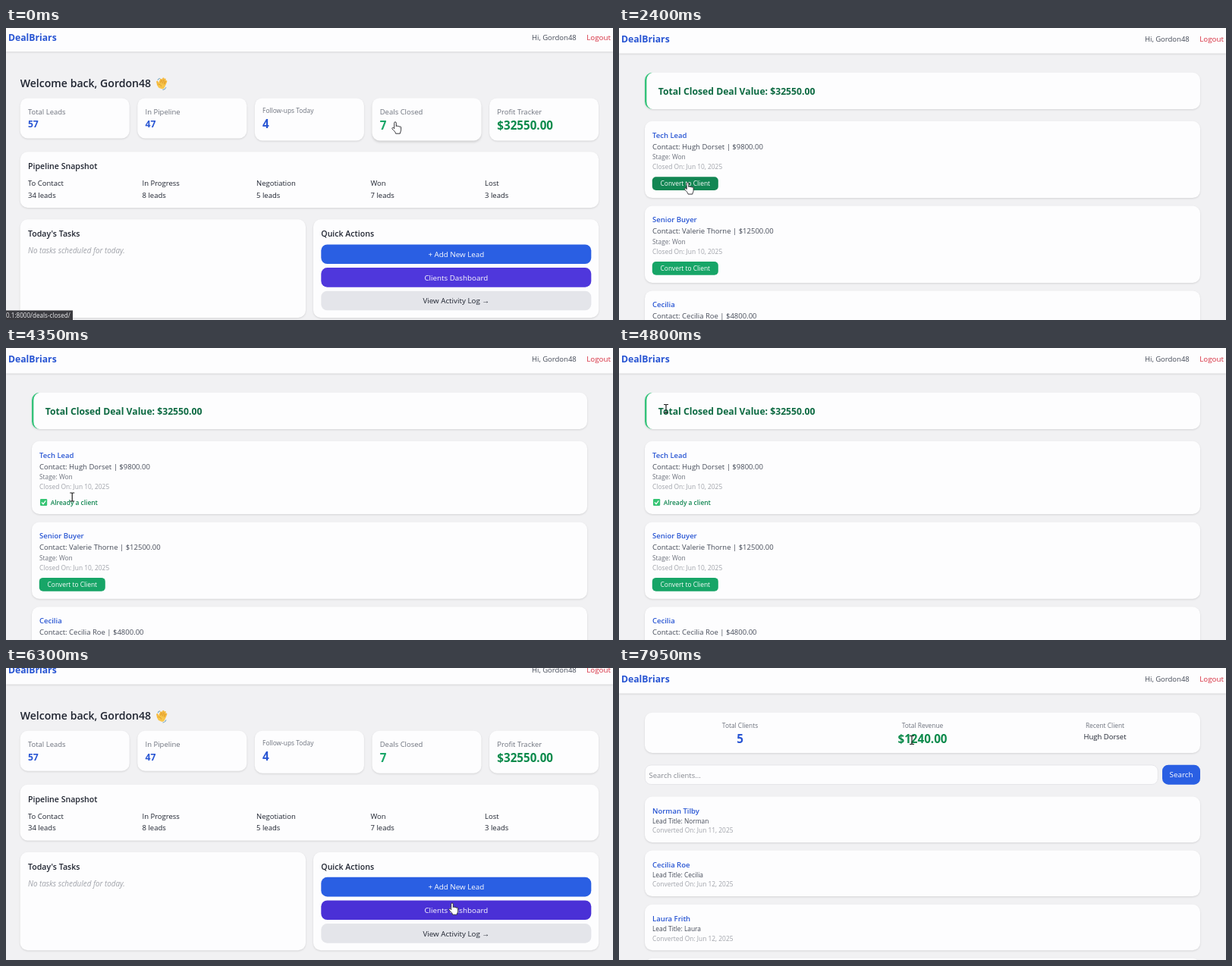
An HTML page for the animation above (8 s loop, 800x385 px).

```html
<!DOCTYPE html>
<html lang="en">
<head>
<meta charset="utf-8">
<title>Lead manager</title>
<style>
  html, body { margin: 0; width: 100%; height: 100%; overflow: hidden; background: #f1f1f3; }
  svg { display: block; width: 800px; height: 385px; }
  text { font-family: "Open Sans", "Noto Sans", sans-serif; white-space: pre; }
  .card { fill: #fdfdfe; filter: drop-shadow(0 1px 1px rgba(0, 0, 0, .12)); }
  .raised { filter: drop-shadow(0 2px 1.5px rgba(0, 0, 0, .14)); }
</style>
</head>
<body>
<svg id="stage" viewBox="0 0 800 385"></svg>
<script>
const LOOP = 8000;
const BASE = 9.5, SMALL = 8.4, MEDIUM = 9.8, LARGE = 10.6, XL = 12.2, XXL = 15.2;
const INK = '#1f2430', SLATE = '#454b58', GRAY = '#6d727d', PALE = '#a0a3aa';
const BLUE = '#2855d3', BUTTON_BLUE = '#2a5fe3', INDIGO = '#4f37dc';
const GREEN = '#17a567', DEEP_GREEN = '#0b8a4b', RED = '#d62f40', WHITE = '#fdfdfe';
const BRAND = 'DealBriars', USER = 'Gordon48';

// Text is placed by the vertical middle of its capitals.
const text = (x, middle, content, size = BASE, fill = INK, weight = 400, extra = '') =>
  `<text x="${x}" y="${middle + size * .357}" font-size="${size}" fill="${fill}" font-weight="${weight}" ${extra}>${content}</text>`;
const centered = (x, middle, content, size, fill, weight) =>
  text(x, middle, content, size, fill, weight, 'text-anchor="middle"');
const box = (x, y, w, h, r, attrs) =>
  `<rect x="${x}" y="${y}" width="${w}" height="${h}" rx="${r}" ${attrs}/>`;
const card = (x, y, w, h, id = '') => box(x, y, w, h, 10, `class="card" ${id && `id="${id}"`}`);
const button = (x, y, w, h, label, fill, { r = 8, size = MEDIUM, color = WHITE, id = '' } = {}) =>
  box(x, y, w, h, r, `fill="${fill}" ${id && `id="${id}"`}`) + centered(x + w / 2, y + h / 2 + .3, label, size, color);
const group = (id, content) => `<g id="${id}">${content}</g>`;

const header = box(0, -20, 800, 53.5, 0, 'class="card"') +
  text(3, 15, BRAND, XL, BLUE, 700) +
  text(693, 15, `Hi, ${USER}`, BASE, SLATE) +
  text(797, 15, 'Logout', MEDIUM, RED, 400, 'text-anchor="end"');

const wave = `<g transform="translate(206 75.5) rotate(22)" fill="none" stroke="#f5b93c" stroke-linecap="round">
  <path stroke-width="2.4" d="M-3.6 1V-4M-1.2 0V-6.5M1.3 0V-6.3M3.7 1V-4.5M-4.5 4L-7 .4"/>
  <rect x="-4.7" y="-1" width="9.5" height="8" rx="3.6" fill="#f8c64b" stroke="none"/>
  <path stroke="#d08a2b" stroke-width=".6" d="M-2.4 0V-4M0 0V-5M2.5 0V-4M0 4Q-2 1-4 3"/>
  <path stroke="#6ba0bd" stroke-width=".9" d="M-5.5-5Q-7-4-7.2-2M6.5 3Q6.4 6 4 7.5"/>
</g>`;

function dashboard() {
  const stats = [
    ['Total Leads', '57', BLUE, 113, 129.5, XL, 53],
    ['In Pipeline', '47', BLUE, 113, 129.5, XL, 53],
    ['Follow-ups Today', '4', BLUE, 111.5, 128.5, XXL, 56],
    ['Deals Closed', '7', GREEN, 113, 131, XXL, 56],
    ['Profit Tracker', '$32550.00', DEEP_GREEN, 113, 131, XXL, 56],
  ].map(([label, value, color, labelY, valueY, size, height], i) => {
    const x = 18.7 + i * 154.6;
    return card(x, 94.8, 144, height, i === 3 ? 'dealsCard' : '') +
      text(x + 10.2, labelY, label, i === 2 ? SMALL : BASE, GRAY) +
      text(x + 10.2, valueY, value, size, color, 700);
  }).join('');
  const stages = [['To Contact', 34], ['In Progress', 8], ['Negotiation', 5], ['Won', 7], ['Lost', 3]]
    .map(([name, count], i) => {
      const x = 29 + i * 150.5;
      return text(x, 207.3, name) + text(x, 222.7, `${count} leads`);
    }).join('');
  return header +
    text(18.7, 75.3, `Welcome back, ${USER}`, 14.1, INK, 600) + wave + stats +
    card(18.7, 165.7, 762.5, 73.7) + text(29, 185, 'Pipeline Snapshot', LARGE, INK, 600) + stages +
    card(18.7, 254.7, 376.3, 129.6) + text(29, 274, "Today's Tasks", LARGE, INK, 600) +
    text(29, 296.3, 'No tasks scheduled for today.', 9.9, PALE, 400, 'font-style="italic"') +
    card(405, 254.7, 376.2, 129.6) + text(415.3, 274, 'Quick Actions', LARGE, INK, 600) +
    button(415.3, 287.8, 356, 25.6, '+ Add New Lead', BUTTON_BLUE) +
    button(415.3, 318.5, 356, 25.6, 'Clients Dashboard', INDIGO, { id: 'clientsButton' }) +
    button(415.3, 349.1, 356, 25.6, 'View Activity Log →', '#e4e5ea', { color: INK });
}

function deals(converted) {
  let y = 122.8;
  const rows = [
    ['Tech Lead', 'Hugh Dorset', '9800.00'],
    ['Senior Buyer', 'Valerie Thorne', '12500.00'],
    ['Cecilia', 'Cecilia Roe', '4800.00'],
  ].map(([title, contact, value], i) => {
    const done = converted && i === 0;
    const height = done ? 96.2 : 101.3;
    const action = done
      ? box(45, y + 76.2, 9.2, 9, 1.2, 'fill="#36c474"') +
        `<path d="M47 ${y + 80.7}l2 2.2 3.3-4.4" fill="none" stroke="#fff" stroke-width="1.2"/>` +
        text(58.7, y + 80.9, 'Already a client', SMALL, '#0f8550', 600)
      : button(43.8, y + 73.4, 87, 17.8, 'Convert to Client', GREEN,
          { r: 5, size: SMALL, id: !converted && i === 0 ? 'convertButton' : '' });
    const row = card(34, y, 732, height) +
      text(44, y + 18.4, title, BASE, BLUE, 600) +
      text(44, y + 33.5, `Contact: ${contact} | $${value}`, BASE, SLATE) +
      text(44, y + 47.6, 'Stage: Won', SMALL, GRAY) +
      text(44, y + 60.2, 'Closed On: Jun 10, 2025', SMALL, PALE) + action;
    y += height + 10.5;
    return row;
  }).join('');
  return header + card(34, 58.8, 732, 48.2) +
    '<path d="M44 58.8A10 10 0 0 0 34 68.8V97A10 10 0 0 0 44 107Q36.4 105 36.4 97V68.8Q36.4 61 44 58.8Z" fill="#35c27a"/>' +
    text(51.7, 84, 'Total Closed Deal Value: $32550.00', XL, '#0d6a42', 700) + rows;
}

function clients() {
  const rows = [['Norman', 'Tilby', 11], ['Cecilia', 'Roe', 12], ['Laura', 'Frith', 12], ['', '', 12]]
    .map(([first, last, day], i) => {
      const y = 169.5 + i * 71.1;
      return card(34, y, 732, 60.5) +
        (first && text(44, y + 18.7, `${first} ${last}`, BASE, BLUE, 600) +
        text(44, y + 32.2, `Lead Title: ${first}`, SMALL, SLATE) +
        text(44, y + 44.9, `Converted On: Jun ${day}, 2025`, SMALL, PALE));
    }).join('');
  return header + card(34, 58.8, 732, 53.2) +
    centered(159.5, 76.3, 'Total Clients', SMALL, GRAY) + centered(159.5, 93.3, '5', XXL, BLUE, 700) +
    centered(400, 76.3, 'Total Revenue', SMALL, GRAY) + centered(400, 93.3, '$1240.00', XXL, DEEP_GREEN, 700) +
    centered(640.5, 76.3, 'Recent Client', SMALL, GRAY) + centered(640.5, 90.5, 'Hugh Dorset') +
    box(34.3, 128, 676, 25.5, 8, `fill="${WHITE}" stroke="#dedfe3" stroke-width=".7"`) +
    text(39.5, 141.3, 'Search clients...', BASE, '#85888f') +
    button(716, 127.7, 50, 26, 'Search', BUTTON_BLUE) + rows;
}

const cursors =
  group('hand', `<path transform="translate(-4.6 -.3)" fill="#fff" stroke="#25252b" stroke-width=".9" stroke-linejoin="round"
    d="M3.3 9V1.5a1.3 1.3 0 0 1 2.6 0V6c0-1 2.2-1 2.2.3 0-.9 2.1-.8 2.1.4 0-.8 2-.7 2 .5V11c0 2-1.3 2.7-1.3 4.5H5.2C5 13 1.8 11 .6 9.2c-.8-1.2.9-2.2 1.9-1.2z"/>`) +
  group('beam', '<path d="M-3-5.5H-1Q0-5.5 0-4.5Q0-5.5 1-5.5H3M0-4.5V4.5M-3 5.5H-1Q0 5.5 0 4.5Q0 5.5 1 5.5H3" fill="none" stroke="#222" stroke-width="1.2"/>') +
  group('arrow', '<path d="M0 0V12.5L2.9 9.9 4.8 14.2 6.7 13.4 4.8 9.2H8.7Z" fill="#fff" stroke="#222" stroke-width=".8"/>');

const pages = { dashboard: dashboard(), deals: deals(false), converted: deals(true), clients: clients() };
document.getElementById('stage').innerHTML =
  box(0, 0, 800, 385, 0, 'fill="#f1f1f3"') +
  Object.entries(pages).map(([id, content]) => group(id, content)).join('') +
  group('status', box(0, 372.4, 88, 13, 0, 'id="statusBox" fill="#3b3b40"') +
    text(0, 379.3, '', 8.1, '#eeeef0', 400, 'id="statusText"')) +
  group('cursor', cursors);

// Each entry holds from its time until the next one.
const PAGE_AT = [[0, 'dashboard'], [450, 'deals'], [3450, 'converted'], [5150, 'dashboard'], [7200, 'clients']];
const SHAPE_AT = [[0, 'hand'], [500, 'arrow'], [1000, 'beam'], [1200, 'arrow'], [1650, 'hand'], [3500, 'beam'],
  [4450, 'arrow'], [4700, 'beam'], [4850, 'arrow'], [4980, 'hand'], [5750, 'arrow'], [6250, 'hand'],
  [7250, 'arrow'], [7850, 'beam']];
const LINK_AT = [[0, 'deals-closed/', 88], [450, ''], [2650, 'leads/convert-to-client/57/', 149], [3450, ''],
  [5050, 'dashboard/', 81], [5800, ''], [6450, 'clients/', 64], [7200, '']];
const PATH = [[0, 513, 124], [450, 512, 125], [850, 420, 140], [1150, 155, 156], [1700, 94, 203], [2600, 90, 204],
  [3600, 90, 206], [4300, 88, 200], [4800, 62, 80], [5000, 38, 15], [5250, 40, 16], [5650, 59, 25],
  [6000, 330, 160], [6300, 588, 310], [7150, 584, 312], [7700, 400, 262], [7950, 386, 95], [8000, 386, 95]];

const $ = id => document.getElementById(id);
const current = (list, t) => list.findLast(entry => entry[0] <= t);
const ease = p => p * p * (3 - 2 * p);
const show = (id, visible) => { $(id).style.display = visible ? '' : 'none'; };

function cursorPosition(t) {
  const i = PATH.findIndex(point => point[0] > t);
  const [t0, x0, y0] = PATH[i - 1], [t1, x1, y1] = PATH[i];
  const p = ease((t - t0) / (t1 - t0));
  return [x0 + (x1 - x0) * p, y0 + (y1 - y0) * p];
}

function draw(now) {
  const t = now % LOOP;
  const page = current(PAGE_AT, t)[1];
  for (const id in pages) show(id, id === page);
  const scroll = t < 450 ? 2.4 : 12 * ease(Math.min(1, Math.max(0, (t - 6050) / 200)));
  $('dashboard').setAttribute('transform', `translate(0 ${-scroll})`);

  $('dealsCard').classList.toggle('raised', t < 450);
  $('convertButton').setAttribute('fill', t >= 1650 ? '#128653' : GREEN);
  $('clientsButton').setAttribute('fill', t >= 6250 ? '#4a30d6' : INDIGO);

  const [, link, width] = current(LINK_AT, t);
  show('status', link);
  if (link) {
    $('statusText').textContent = `0.1:8000/${link}`;
    $('statusBox').setAttribute('width', width);
  }

  const shape = current(SHAPE_AT, t)[1];
  for (const id of ['hand', 'beam', 'arrow']) show(id, id === shape);
  $('cursor').setAttribute('transform', `translate(${cursorPosition(t)})`);
}

const start = performance.now();
function loop() {
  draw(performance.now() - start);
  requestAnimationFrame(loop);
}
loop();
</script>
</body>
</html>
```
